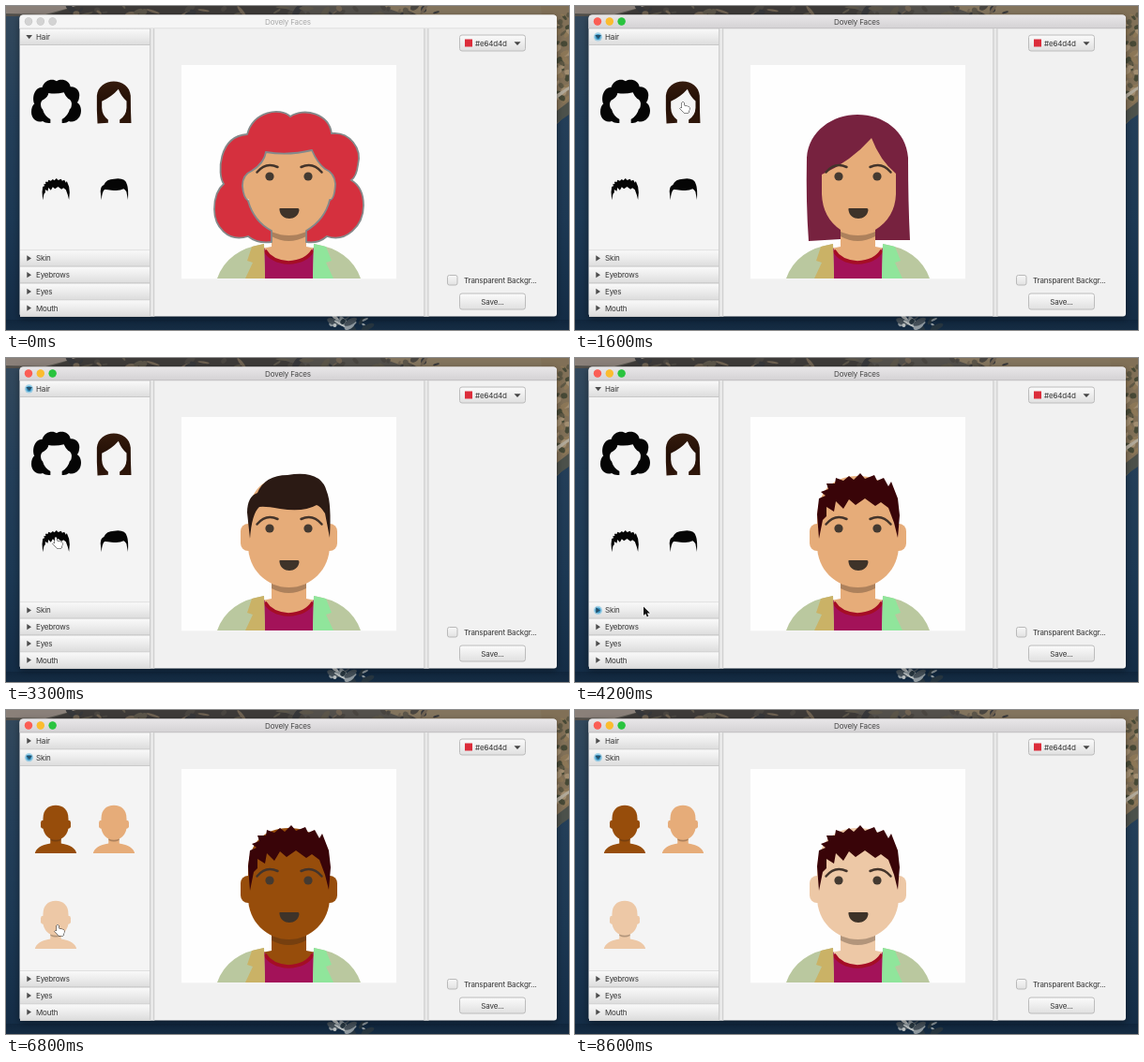
Recreate the animation shown at these times as an HTML page with a canvas. Size 600 by 346 pixels, loop 8.7 s.

```html
<!DOCTYPE html>
<html lang="en">
<head>
<meta charset="utf-8">
<title>Dovely Faces</title>
<style>
html, body { margin: 0; width: 100%; height: 100%; overflow: hidden; background: #1b3550; }
canvas { display: block; width: 600px; height: 346px; }
</style>
</head>
<body>
<canvas id="stage"></canvas>
<script>
const W = 600, H = 346, LOOP = 8700, STEP = 100;
const FONT = '"Inter", "Roboto", sans-serif';
const canvas = document.getElementById('stage');
const dpr = window.devicePixelRatio || 1;
canvas.width = W * dpr;
canvas.height = H * dpr;
const ctx = canvas.getContext('2d');

const HAIR = {
  curly: new Path2D('M283 252 Q268 254 258 246 C236 253 222 235 222 217 C222 204 226 195 232 190 C225 180 226 139 257 137 C264 112 292 108 303 118 C318 108 344 115 347 136 C366 134 380 152 375 170 C374 178 372 183 368 186 C378 192 381 203 381 213 C381 235 362 253 342 246 Q333 254 320 252 V240 Q340 228 345 207 Q350 207 351 190 Q350 178 340 174 Q332 168 326 154 Q301 160 277 156 Q275 168 262 176 Q252 180 252 192 Q253 205 258 208 Q264 230 283 240Z'),
  long: new Path2D('M249 251 Q246 210 247 162 C249 133 275 116 301 116 C328 116 353 133 355 162 Q355 210 357 250 L320 250 V239 Q341 226 342 201 V179 Q325 165 316 141 Q294 166 263 180 V201 Q264 226 283 239 V249Z'),
  spiky: new Path2D('M260 193 L258 167 L260 150 L267 147 L262 143 L270 140 L268 134 L277 134 L278 128 L286 131 L292 126 L297 130 L304 123 L309 129 L319 125 L322 131 L329 128 L334 137 L337 132 L344 150 L346 168 L344 192 L340 176 L334 160 L326 154 L320 158 L309 150 L299 157 L292 151 L286 161 L278 153 L276 164 L268 159 L268 169 L264 173Z'),
  quiff: new Path2D('M260 193 L257 165 Q257 148 268 144 Q276 125 300 125 Q336 119 342 143 Q347 155 345 192 L340 166 Q335 158 331 157 Q317 165 292 161 Q276 158 270 159 Q262 166 260 193Z')
};
const BODY = {
  torso: new Path2D('M230 291 Q236 264 283 257 V235 H320 V257 Q367 264 373 291Z'),
  shade: new Path2D('M283 238 H320 V246 Q301 256 283 246Z'),
  head: new Path2D('M258 172 C258 142 275 126 301.5 126 S345 142 345 172 V200 C345 226 325 245 301.5 245 S258 226 258 200Z'),
  shirt: new Path2D('M275 258 Q282 272 301 273 Q320 272 328 258 V291 H275Z'),
  collar: new Path2D('M276 261 Q283 273 301 274 Q320 273 327 261'),
  coatL: new Path2D('M225 291 Q236 260 275 254 L276 291Z'),
  coatR: new Path2D('M378 291 Q367 260 328 254 L327 291Z'),
  lapelL: new Path2D('M275 254 L262 257 L257 272 L263 274 L255 291 H276Z'),
  lapelR: new Path2D('M328 254 L341 257 L347 272 L341 274 L349 291 H327Z'),
  brows: new Path2D('M267.500 177.500 Q277 166 289.500 172 M336.500 177.500 Q327 166 314.500 172'),
  mouth: new Path2D('M292 216 H311 Q312.500 216 312.500 218 C311 230 293 230 291.500 218 Q291 216 292 216Z')
};
const ARROW = new Path2D('M0 0 V9.500 L2.200 7.500 L3.800 11 L5.400 10.300 L3.900 7 H7Z');
const HAND = new Path2D('M-1 0 Q0 -1.500 1 0 L1.500 3.500 L6 4.500 Q7.500 5 7 7 L6 11 H1 L-3 6.500 Q-3 5 -1 6Z');

const SKIN = { tan: '#e6ac79', brown: '#974d0b', light: '#edc8a6' };
const HUE = { curly: '#d5303e', long: '#77223f', spiky: '#390408', quiff: '#2b1a14' };

// Stepped states: [start, value]
const hairAt = [[0, 'curly'], [1600, 'long'], [2700, 'quiff'], [3400, 'spiky']];
const skinAt = [[0, 'tan'], [6100, 'brown'], [7000, 'light']];
// Pointer stops: [time, x, y]
const pointer = [
  [100, 330, 90], [600, 250, 137], [900, 250, 137], [1400, 115, 103], [1800, 115, 103],
  [2300, 116, 187], [2800, 116, 187], [3200, 53, 192], [3700, 53, 192], [4100, 73, 265.5],
  [4700, 73, 265.5], [5500, 52, 130], [6200, 52, 130], [6600, 55, 230], [7100, 55, 230],
  [7200, 66, 224], [7400, 328, 160], [7900, 328, 160]
];

const ease = p => p * p * (3 - 2 * p);
const pick = (list, t) => list.filter(s => s[0] <= t).pop()[1];

function fill(path, color) {
  ctx.fillStyle = color;
  ctx.fill(path);
}
function rect(x, y, w, h, color) {
  ctx.fillStyle = color;
  ctx.fillRect(x, y, w, h);
}
function vGrad(y0, y1, ...colors) {
  const g = ctx.createLinearGradient(0, y0, 0, y1);
  colors.forEach((c, i) => g.addColorStop(i / (colors.length - 1), c));
  return g;
}
function poly(color, ...pts) {
  ctx.beginPath();
  for (let i = 0; i < pts.length; i += 2) ctx.lineTo(pts[i], pts[i + 1]);
  ctx.fillStyle = color;
  ctx.fill();
}
function dot(x, y, r, color) {
  ctx.beginPath();
  ctx.arc(x, y, r, 0, 7);
  ctx.fillStyle = color;
  ctx.fill();
}
function box(x, y, w, h, r, paint, border) {
  ctx.beginPath();
  ctx.roundRect(x, y, w, h, r);
  ctx.fillStyle = paint;
  ctx.fill();
  if (border) {
    ctx.strokeStyle = border;
    ctx.lineWidth = 1;
    ctx.stroke();
  }
}
function label(s, x, y, color = '#333', align = 'left') {
  ctx.font = '8px ' + FONT;
  ctx.letterSpacing = '-0.15px';
  ctx.textAlign = align;
  ctx.fillStyle = color;
  ctx.fillText(s, x, y);
}
function clipped(x, y, w, h, draw) {
  ctx.save();
  ctx.beginPath();
  ctx.rect(x, y, w, Math.max(0, h));
  ctx.clip();
  draw();
  ctx.restore();
}
// Draws avatar parts with the point (301.5, baseY) moved to (x, y)
function placed(x, y, scale, baseY, draw) {
  ctx.save();
  ctx.translate(x, y);
  ctx.scale(scale, scale);
  ctx.translate(-301.5, -baseY);
  draw();
  ctx.restore();
}

function speckle(n, seed, x, y, w, h, colors) {
  const rnd = () => (seed = seed * 16807 % 2147483647) / 2147483647;
  for (let i = 0; i < n; i++) {
    ctx.beginPath();
    ctx.ellipse(x + rnd() * w, y + rnd() * h, 2 + rnd() * 6, 1 + rnd() * 2.5, rnd() * 2 - 1, 0, 7);
    ctx.fillStyle = colors[Math.floor(rnd() * colors.length)];
    ctx.fill();
  }
}
function wallpaper() {
  rect(0, 0, W, H, vGrad(0, H, '#34495c', '#243f59', '#1c3853', '#132b44'));
  rect(0, 0, W, 11, '#53504b');
  poly('#8a8079', 0, 0, 75, 0, 42, 9, 0, 8);
  poly('#3d3a38', 75, 0, 290, 0, 320, 11, 42, 11);
  poly('#83745d', 400, 0, 600, 0, 600, 20, 430, 11);
  speckle(50, 41, 70, 0, 390, 10, ['#6f6252', '#494540', '#5b5549', '#36373a']);
  poly('#817057', 570, 0, 600, 0, 600, 113, 587, 126, 580, 90);
  speckle(42, 73, 585, 8, 16, 92, ['#a18d70', '#5e5844', '#8c7757', '#474936']);
  poly('#b2aa9a', 587, 94, 600, 86, 600, 89, 587, 99);
  poly('#4c514b', 587, 112, 600, 102, 600, 116, 587, 125);
  rect(0, 335, W, 11, vGrad(335, 346, '#10263d', '#152c43'));
  speckle(18, 19, 348, 333, 42, 11, ['#8f999f', '#bac0c1', '#45515a', '#26353f']);
}

function bust(skin) {
  fill(BODY.torso, skin);
  fill(BODY.shade, 'rgba(40,30,25,.3)');
  box(250, 177, 103, 29, 8, skin);
  fill(BODY.head, skin);
}
function avatar(t) {
  const style = pick(hairAt, t);
  rect(187, 63, 229, 228.5, '#fefefe');
  bust(SKIN[pick(skinAt, t)]);
  fill(BODY.shirt, '#a31259');
  ctx.strokeStyle = '#a50d25';
  ctx.lineWidth = 3.5;
  ctx.stroke(BODY.collar);
  fill(BODY.coatL, '#bac89f');
  fill(BODY.coatR, '#bac89f');
  fill(BODY.lapelL, '#cab266');
  fill(BODY.lapelR, '#90e59b');
  fill(HAIR[style], HUE[style]);
  ctx.strokeStyle = '#43342b';
  ctx.lineWidth = 2.5;
  ctx.lineCap = 'round';
  ctx.stroke(BODY.brows);
  ctx.lineCap = 'butt';
  dot(281, 182, 4.6, '#443a31');
  dot(322, 182, 4.6, '#443a31');
  fill(BODY.mouth, '#3e3329');
  if (t < 1100) {
    ctx.strokeStyle = '#84898a';
    ctx.lineWidth = 1.8;
    ctx.stroke(HAIR.curly);
    if (t >= 500) {
      ctx.strokeStyle = '#52c3c0';
      ctx.setLineDash([1.5, 1.2]);
      ctx.stroke(HAIR.curly);
      ctx.setLineDash([]);
    }
  }
}

function header(text, y, open, lit) {
  rect(15, y, 138.5, 17.7, vGrad(y, y + 17.7, '#fafafa', '#ececec', '#dcdcdc'));
  rect(15, y, 138.5, 0.6, '#cfcfcf');
  rect(15, y + 17.2, 138.5, 0.7, '#bdbdbd');
  const c = y + 8.9;
  if (lit) {
    dot(24.5, c, 4.6, 'rgba(100,185,225,.55)');
    dot(24.5, c, 3, '#3b9ac9');
  }
  const ink = lit ? '#24506b' : '#4c4c4c';
  if (open) poly(ink, 21.3, c - 2, 28, c - 2, 24.7, c + 2.4);
  else poly(ink, 22.3, c - 3.1, 27, c, 22.3, c + 3.1);
  label(text, 32, y + 11.8);
}
function hairThumbs() {
  const s = 0.333;
  placed(53.5, 79, s, 114, () => fill(HAIR.curly, '#050505'));
  placed(115, 80.5, s, 116, () => fill(HAIR.long, vGrad(116, 250, '#351b0d', '#241006', '#2e160a')));
  placed(53, 184, s, 123, () => fill(HAIR.spiky, '#050505'));
  placed(115.5, 184, s, 123, () => fill(HAIR.quiff, '#050505'));
}
function skinThumbs() {
  placed(53, 153, 0.31, 291, () => bust(SKIN.brown));
  placed(115, 153, 0.31, 291, () => bust(SKIN.tan));
  placed(53, 255, 0.31, 291, () => bust(SKIN.light));
}
function accordion(t) {
  const p = ease(Math.min(1, Math.max(0, (t - 4500) / 400)));
  const y = 260.5 - 218.7 * p;
  rect(15, 24, 138.5, 308, '#f4f4f4');
  clipped(15, 41.5, 139, y - 41.5, hairThumbs);
  clipped(15, y + 17.7, 139, 260.5 - y, () => {
    ctx.translate(0, y - 41.8);
    skinThumbs();
  });
  header('Hair', 24, p < 0.5, t >= 1000 && t < 4000);
  header('Skin', y, p >= 0.5, t >= 4000);
  ['Eyebrows', 'Eyes', 'Mouth'].forEach((s, i) => header(s, 278.3 + 17.7 * i, false, false));
}

function divider(x) {
  rect(x, 24, 5, 307.5, '#e9e9e9');
  rect(x, 24, 0.8, 307.5, '#bfbfbf');
  rect(x + 4, 24, 0.8, 307.5, '#c4c4c4');
}
function windowFrame(active) {
  ctx.save();
  ctx.shadowColor = 'rgba(0,0,0,.45)';
  ctx.shadowBlur = 7 * dpr;
  ctx.shadowOffsetY = 2 * dpr;
  box(14.5, 9.5, 572.5, 322, [4, 4, 3, 3], '#f1f1f1');
  ctx.restore();
  box(14.5, 9.5, 572.5, 14.5, [4, 4, 0, 0], active ? vGrad(9, 24, '#e9e7e9', '#d4d2d4') : '#f5f5f5');
  rect(14.5, 23.5, 572.5, 0.7, active ? '#b7b5b7' : '#d6d6d6');
  const lights = active ? ['#fb5e55', '#fbbc2f', '#2ac43f'] : ['#d3d3d3', '#d3d3d3', '#d3d3d3'];
  lights.forEach((c, i) => {
    dot(24 + 12.8 * i, 16.5, 4.2, active ? c : '#c3c3c3');
    dot(24 + 12.8 * i, 16.5, 3.7, c);
  });
  label('Dovely Faces', 300.5, 19.5, active ? '#454545' : '#a8a8a8', 'center');
}
function sidebar() {
  const btn = y => box(483.5, y, 70, 17, 2.5, vGrad(y, y + 17, '#fbfbfb', '#e0e0e0'), '#bcbcbc');
  btn(31);
  rect(489, 35.5, 8, 8, '#dc2c3a');
  label('#e64d4d', 500, 42.7);
  poly('#444', 541.5, 38.3, 548.5, 38.3, 545, 42);
  box(470.5, 287.5, 10.5, 10.5, 2, vGrad(287, 298, '#f8f8f8', '#e2e2e2'), '#b9b9b9');
  label('Transparent Backgr...', 488, 295.7);
  btn(307);
  label('Save...', 518.5, 318.7, '#333', 'center');
}

function drawPointer(t) {
  const last = pointer.length - 1;
  if (t < pointer[0][0] || t > pointer[last][0]) return;
  let i = 0;
  while (i < last - 1 && t >= pointer[i + 1][0]) i++;
  const [t0, x0, y0] = pointer[i], [t1, x1, y1] = pointer[i + 1];
  const k = ease((t - t0) / (t1 - t0));
  const x = x0 + (x1 - x0) * k, y = y0 + (y1 - y0) * k;
  const hand = x < 140 && y > 75 && y < 256;
  ctx.save();
  ctx.translate(x, y);
  ctx.lineJoin = 'round';
  ctx.lineWidth = hand ? 1 : 1.4;
  ctx.strokeStyle = hand ? '#222' : '#fff';
  ctx.stroke(hand ? HAND : ARROW);
  fill(hand ? HAND : ARROW, hand ? '#fff' : '#111');
  ctx.restore();
}

function render(t) {
  ctx.setTransform(dpr, 0, 0, dpr, 0, 0);
  wallpaper();
  windowFrame(t >= 1000);
  accordion(t);
  divider(153.3);
  divider(445.5);
  clipped(187, 63, 229, 228.5, () => avatar(t));
  sidebar();
  drawPointer(t);
}

const start = performance.now();
function tick() {
  const t = (performance.now() - start) % LOOP;
  render(Math.floor(t / STEP) * STEP);
  requestAnimationFrame(tick);
}
tick();
</script>
</body>
</html>
```
